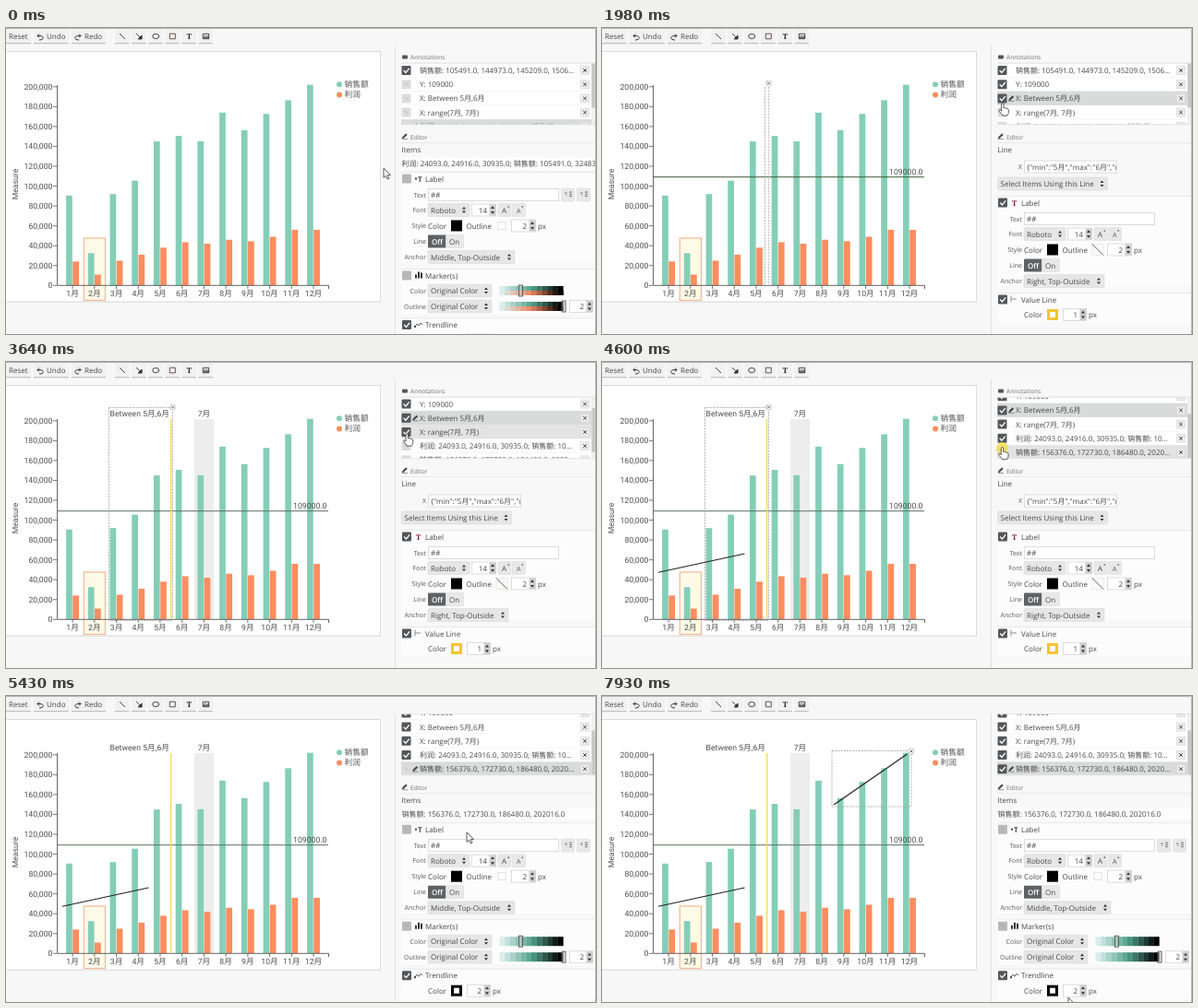
An HTML page for the animation above (8000 ms loop, 639 by 332 pixels).

```html
<!DOCTYPE html>
<html lang="zh">
<head>
<meta charset="utf-8">
<title>Chart annotations</title>
<style>
html, body { margin: 0; width: 100%; height: 100%; overflow: hidden; background: #f7f7f7; }
svg { display: block; width: 639px; height: 332px; }
text { font: 8px "Open Sans", "Noto Sans CJK SC", "Noto Sans CJK", sans-serif; fill: #484848; white-space: pre; text-rendering: geometricPrecision; }
.s { font-size: 7px; fill: #585858; }
.h { font-size: 6.6px; fill: #707070; }
.c { font: 8.7px Roboto, "Noto Sans CJK SC", "Noto Sans CJK", sans-serif; fill: #505050; }
.r { text-anchor: end; }
.m { text-anchor: middle; }
</style>
</head>
<body>
<svg id="stage" viewBox="0 0 639 332" xmlns="http://www.w3.org/2000/svg"></svg>
<script>
const LOOP = 8000;
const GREEN = '#84ceb7', ORANGE = '#fb8d5f', DARK = '#54575a';
const PITCH = 15.2, TOP = 38.4;

// Drawing helpers: each returns markup
const text = (x, y, s, cls = '', more = '') => `<text x="${x}" y="${y}" class="${cls}" ${more}>${s}</text>`;
const rect = (x, y, w, h, fill, stroke = 'none', more = '') =>
  `<rect x="${x}" y="${y}" width="${w}" height="${h}" fill="${fill}" stroke="${stroke}" ${more}/>`;
const path = (d, stroke = '#333', w = 1, fill = 'none', more = '') =>
  `<path d="${d}" stroke="${stroke}" stroke-width="${w}" fill="${fill}" ${more}/>`;
const group = (id, body, more = '') => `<g id="${id}" ${more}>${body}</g>`;

const checkOn = (x, y) => rect(x, y - 5, 10, 10, DARK, 'none', 'rx="1"') +
  path(`M${x + 2.2} ${y}l2.2 2.4 3.8-4.6`, '#fff', 1.3);
const checkOff = (x, y, fill = '#dcdcdc') => rect(x, y - 5, 10, 10, fill, 'none', 'rx="1"') +
  path(`M${x + 3.5} ${y - 1.5}l3 3`, '#aaa', .9);
const closeDot = (x, y) => `<circle cx="${x}" cy="${y}" r="3.2" fill="#f2f2f2" stroke="#c4c4c4" stroke-width=".7"/>` +
  path(`M${x - 1.3} ${y - 1.3}l2.6 2.6m0-2.6l-2.6 2.6`, '#666', .8);
const pen = (x, y) => path(`M${x} ${y + 2.4}l.8-2 3.4-3.2 1.2 1.2-3.4 3.2z`, '#333', .5, '#444') +
  path(`M${x} ${y + 3}h6`, '#555', .6);
const arrows = (x, y, gap = 1) => path(`M${x - 2} ${y - gap}l2-2.6 2 2.6zm0 ${2 * gap}l2 2.6 2-2.6z`, 'none', 0, '#333');
const select = (x, y, w, s) => rect(x, y - 7, w, 14, '#e6e6e6', '#dadada', 'stroke-width=".6" rx="1"') +
  text(x + 3, y + 3, s) + arrows(x + w - 6, y);
const number = (x, y, w, s) => rect(x + .5, y - 6.5, w - 1, 13, '#fff', '#d4d4d4', 'stroke-width=".8"') +
  text(x + w - 10, y + 3, s, 'r') + rect(x + w - 7.5, y - 6, 7, 12, '#cdcdcd') + arrows(x + w - 4, y, 1.6);
const input = (x, y, w, s) => rect(x + .5, y - 6.5, w, 13, '#fff', '#d4d4d4', 'stroke-width=".8"') + text(x + 3, y + 3, s);
const button = (x, y, w, body) => rect(x, y - 7, w, 14, '#e8e8e8', '#dcdcdc', 'stroke-width=".6" rx="1"') + body;
const frame = (x, y, color) => rect(x + 1.5, y - 4.5, 9, 9, '#fff', color, 'stroke-width="3"');
const side = (y, s) => text(455, y + 2.6, s, 's r');

function header(y, h, on, icon, s) {
  return rect(428, y - 7, 210, h, '#fcfcfc') + path(`M428 ${y - 7}h210`, '#e4e4e4', .8) +
    (on ? checkOn(429, y) : checkOff(429, y, '#b8b8b8')) + icon + text(454, y + 3, s);
}

function labelBlock(y, line) {
  const icon = line
    ? text(444, y + 3.2, 'T', '', 'style="font-weight:700;fill:#8a2030;font-family:Noto Serif,serif"')
    : text(446, y + 3, 'T', '', 'style="font-weight:700"') + rect(443, y - 1, 2, 2, '#444');
  const lines = x => button(x, y + 17.5, 14, path(`M${x + 3.5} ${y + 15.5}h2.5m-1.2 2h1.2m2.5-3h3m-3 2.2h3m-3 2.2h3`, '#666', .9));
  const outline = line
    ? rect(531, y + 45, 12, 12, '#fbfaf8', '#e2e2e2', 'stroke-width=".6"') + path(`M531 ${y + 45}l12 12`, '#65483c', .9)
    : rect(533, y + 47, 8, 8, '#fff', '#d4d4d4', 'stroke-width=".7"');
  return header(y, 98, line, icon, 'Label') +
    side(y + 17.5, 'Text') + input(457, y + 17.5, 141, '##') + (line ? '' : lines(601.5) + lines(618.5)) +
    side(y + 34, 'Font') + select(457, y + 34, 45, 'Roboto') + number(504, y + 34, 27, '14') +
    button(533, y + 34, 14, text(537, y + 37, 'A') + path(`M543 ${y + 31}l1.2-1.6 1.2 1.6z`, 'none', 0, '#444')) +
    button(548.5, y + 34, 14, text(553, y + 37, 'A', 's') + path(`M558 ${y + 30}l1.2 1.6 1.2-1.6z`, 'none', 0, '#444')) +
    side(y + 51, 'Style') + text(457, y + 54, 'Color') + rect(482, y + 45, 12, 12, '#000') +
    text(498.5, y + 54, 'Outline') + outline + number(547, y + 51, 27, '2') + text(576, y + 54, 'px') +
    side(y + 68, 'Line') + rect(457, y + 61, 19.5, 14, '#5f6265', 'none', 'rx="1"') +
    text(461, y + 71, 'Off', '', 'style="fill:#fff;font-weight:600"') +
    rect(476.5, y + 61, 19, 14, '#e8e8e8', '#dcdcdc', 'stroke-width=".6"') + text(480, y + 71, 'On') +
    side(y + 85, 'Anchor') + (line ? select(457, y + 85, 87, 'Right, Top-Outside') : select(457, y + 85, 94, 'Middle, Top-Outside'));
}

function ramp(x, y, h, base) {
  const pale = [218, 238, 238];
  let out = '';
  for (let i = 0; i < 12; i++) {
    const k = i / 11;
    const rgb = base.map((v, n) => Math.round(k < .5 ? pale[n] + (v - pale[n]) * k * 2 : v * (1 - k) * 2));
    out += rect(x + i * 5.75, y, 5.9, h, `rgb(${rgb})`);
  }
  return out;
}

function itemsEditor() {
  const g = [80, 162, 138], o = [240, 130, 92];
  const slider = (y, handle) =>
    ramp(534.5, y - 5, 10, g) + `<g class="mixed">${ramp(534.5, y, 5, o)}</g>` +
    rect(handle - 2, y - 6, 4, 12, 'rgba(200,200,200,.4)', '#555', 'stroke-width=".9"');
  const bars = path('M444 271.5v-4m3 4v-7m3 7v-6', '#333', 2);
  const wave = path('M443 324l2-3 2 2 2-3 2 2', '#444', .9) + rect(442, 323, 2, 2, '#444');
  return text(428.5, 135, 'Items') + rect(428, 140.5, 210, 13, '#fdfdfd') + text(428.5, 150, '', '', 'id="picked"') +
    labelBlock(163.5, false) +
    header(268.5, 49, false, bars, 'Marker(s)') +
    side(285, 'Color') + select(457, 285, 69, 'Original Color') + slider(285, 557.5) +
    side(302, 'Outline') + select(457, 302, 69, 'Original Color') + slider(302, 604) + number(610, 302, 26, '2') +
    header(322, 32, true, wave, 'Trendline') +
    text(457, 341.5, 'Color') + frame(482, 338.5, '#000') + number(499, 338.5, 26, '2') + text(527, 341.5, 'px');
}

function lineEditor() {
  return text(428.5, 135, 'Line') + side(150.5, 'X') + rect(457.5, 144, 100, 13, '#fff', '#d4d4d4', 'stroke-width=".8"') +
    text(460, 153.5, '{"min":"5月","max":"6月","or', '', 'clip-path="url(#field)"') +
    select(428.5, 169, 119, 'Select Items Using this Line') +
    labelBlock(189.5, true) +
    header(294.5, 32, true, path('M443 290.5v7m0-3.5h6', '#777', .8), 'Value Line') +
    text(457, 314, 'Color') + frame(482, 311, '#f6c52e') + number(499, 311, 26, '1') + text(527, 314, 'px');
}

const rowNames = ['销售额: 105491.0, 144973.0, 145209.0, 1506…', 'Y: 109000', 'X: Between 5月,6月', 'X: range(7月, 7月)',
  '利润: 24093.0, 24916.0, 30935.0; 销售额: 10…', '销售额: 156376.0, 172730.0, 186480.0, 2020…'];
const checkedAt = [-1, 1100, 1500, 2400, 4120, 6680];

function row(name, i) {
  const y = TOP + PITCH * (i + .5);
  return rect(428, y - PITCH / 2, 206, PITCH, '#fff', 'none', `id="row${i}"`) +
    path(`M428 ${y + PITCH / 2}h206`, '#e6e6e6', .7) +
    group('off' + i, checkOff(428.5, y)) + group('on' + i, checkOn(428.5, y)) + group('pen' + i, pen(440.5, y)) +
    text(448, y + 3, name) + rect(622.5, y - 4.5, 9, 9, '#ececec', '#d8d8d8', 'stroke-width=".7"') +
    path(`M625.2 ${y - 1.8}l3.6 3.6m0-3.6l-3.6 3.6`, '#444', 1);
}

function toolbar() {
  const base = (x, w) => rect(x, 1, w, 16, '#f1f1f1') + path(`M${x} 16.7h${w}`, '#b0b0b0', .9);
  const icons = ['M-3-3L3 3', 'M-3-3L2 2M3 3v-4l-4 4z', 'M-3.5 0a3.5 2.6 0 1 0 7 0a3.5 2.6 0 1 0-7 0', 'M-3-2.8h6v5.6h-6z', '', 'M-3.2-2.7h6.4v5.4h-6.4zm.6 4.4l2-2.6 1.4 1.5 1.2-1 1.2 2.1z'];
  let out = rect(0, 0, 639, 19, '#f7f7f7') + base(0, 27) + text(3, 12, 'Reset') + base(30, 38) + text(44, 12, 'Undo') + base(71, 37) + text(85, 12, 'Redo') +
    path('M36 13c5 0 6-4 1-4.5h-3m2-2l-2 2 2 2', '#333', 1) + path('M79 13c-5 0-6-4-1-4.5h3m-2-2l2 2-2 2', '#333', 1);
  icons.forEach((d, i) => {
    const x = 118 + i * 18.1;
    out += base(x, 15.5) + (d ? path(d, i === 3 ? '#5a4038' : '#333', .9, i === 1 ? '#333' : 'none', `transform="translate(${x + 8} 9)"`)
      : text(x + 8, 12, 'T', 'm', 'style="font-weight:700;font-family:Noto Serif,serif;fill:#223"'));
  });
  return out;
}

function chart() {
  const sales = [90500, 32483, 92000, 105491, 144973, 150600, 145209, 174000, 156376, 172730, 186480, 202016];
  const profit = [24093, 10900, 24916, 30935, 38000, 43500, 42000, 46000, 44500, 49000, 56000, 56000];
  const yOf = v => 279.3 - v * 215.5 / 200000;
  let out = rect(-2, 25, 408, 273, '#ececec') + rect(-2, 25.5, 407.5, 271.5, '#fff', '#d4d4d4', 'stroke-width=".8"') +
    rect(84.3, 228, 23.2, 67.5, '#fdfbe8', '#f5b697', 'stroke-width="1.2"') +
    group('band', rect(204, 62, 21, 217, '#ededed') + text(214.5, 58.5, '7月', 'c m', 'id="bandText"'));
  sales.forEach((v, i) => {
    const x = 72.1 + i * 23.72;
    out += rect(x - 7, yOf(v), 6.7, yOf(0) - yOf(v), GREEN) + rect(x + .2, yOf(profit[i]), 6.7, yOf(0) - yOf(profit[i]), ORANGE) +
      path(`M${x} 279v4`, '#555', .8) + text(x, 291, i + 1 + '月', 'c m');
  });
  for (let v = 0; v <= 200000; v += 20000)
    out += path(`M51 ${yOf(v)}h4`, '#555', .8) + text(50.5, yOf(v) + 3, v.toLocaleString('en-US'), 'c r');
  const dash = 'stroke-dasharray="2 1.2"';
  return out + path('M55.5 62V279.3H349.5V283', '#555', .9) + text(0, 0, 'Measure', 'c m', 'transform="translate(13 169.5) rotate(-90)"') +
    `<circle cx="361" cy="61.3" r="3" fill="${GREEN}"/><circle cx="361" cy="72.6" r="3" fill="${ORANGE}"/>` +
    text(366.5, 64.4, '销售额', 'c') + text(366.5, 75.4, '利润', 'c') +
    group('level', path('M55 161.7H349', '#456', 1, 'none', 'id="levelLine"') + text(347.5, 159, '109000.0', 'c r', 'id="levelText"')) +
    group('between', path('M178.7 62V279', '#f5d655', 1.3) + text(177, 58.5, 'Between 5月,6月', 'c r')) +
    group('narrow', path('M176.5 64V281M180.7 64V281', '#aaa', .9, 'none', dash) + closeDot(180.5, 60)) +
    group('wide', rect(111.5, 49.5, 69, 231, 'none', '#aaa', dash + ' stroke-width=".9"') + closeDot(180.5, 49)) +
    group('trendA', path('M61 228.2L154.5 208', '#222', 1.1)) +
    group('trendB', rect(249, 59.5, 86, 60.5, 'none', '#aaa', dash + ' stroke-width=".9"') + path('M251 118L330.5 63', '#222', 1.2) + closeDot(335, 60));
}

const hand = path('M-1.2 1.2C-1.2-.6 1.2-.6 1.2 1.2V5C2 4.4 3 4.6 3.2 5.4 4 4.9 4.9 5.2 5 6 5.8 5.7 6.5 6.2 6.5 7V9.5C6.5 11.5 5.4 12 5.2 13.2H0C-.5 11.6-3.5 9.2-4 7.8-4.1 6.7-2.8 6.6-1.2 8.2Z', '#333', .8, '#fff');
const arrow = path('M0 0V10.4L2.5 8.2 4.2 12 6 11.2 4.3 7.6H7.5Z', '#333', .8, '#fff');

stage.innerHTML =
  '<defs><clipPath id="list"><rect x="428" y="38.4" width="206" height="66"/></clipPath>' +
  '<clipPath id="field"><rect x="458" y="144" width="99" height="13"/></clipPath></defs>' +
  rect(0, 0, 639, 332, '#f7f7f7') + chart() + rect(421.5, 18, 218, 314, '#f8f8f8') +
  group('panel',
    rect(429, 29.5, 6, 4, '#555', 'none', 'rx="1"') + text(438, 34, 'Annotations', 'h') +
    rect(428, 38.4, 210, 66, '#fff') +
    group('listBox', group('rows', rowNames.map(row).join('')), 'clip-path="url(#list)"') +
    rect(634, 38.4, 5, 66, '#f0f0f0') + rect(634.3, 38.4, 4, 48, '#c8c8c8', 'none', 'id="thumb"') +
    path('M428 104.7h210M428 38.2h210', '#dcdcdc', .8) +
    pen(429, 117.5) + text(438, 120.5, 'Editor', 'h') + path('M428 124.5h210', '#e6e6e6', .8) +
    group('items', itemsEditor()) + group('line', lineEditor())) +
  path('M421.5 18V332', '#e2e2e2', 1) + toolbar() +
  path('M0 .5H638.5V332', '#b8b8b8', 1) +
  group('cursor', '<circle id="spot" cx="0" cy="1" r="6.5" fill="#f6dc45" opacity=".8"/>' + group('hand', hand) + group('arrow', arrow));

const el = id => document.getElementById(id);
const show = (id, on) => el(id).style.display = on ? '' : 'none';
const ease = k => k * k * (3 - 2 * k);
const progress = (t, a, b) => ease(Math.min(1, Math.max(0, (t - a) / (b - a))));

// time, x, y of the pointer tip
const moves = [[70, 409, 152], [830, 434, 58], [1230, 434, 58], [1420, 433.5, 71], [1640, 433.5, 71], [2190, 434, 87], [2500, 434, 87],
  [2800, 435, 75], [3250, 435, 75], [3850, 434, 79], [4400, 434, 79], [4590, 433.5, 92.5], [4870, 433.5, 92.5], [5430, 499, 148],
  [5640, 519, 185], [5900, 515, 268], [6300, 414, 110], [6540, 428.5, 74.5], [6900, 428.5, 74.5], [7240, 470, 203], [7370, 470, 203], [7930, 505, 327]];
const clicks = [[1030, 1230], [1400, 1570], [2330, 2480], [3080, 3220], [4050, 4200], [4560, 4740], [6640, 6780]];

function pointer(t) {
  let a = moves[0];
  for (const b of moves) {
    if (t < b[0]) {
      const k = progress(t, a[0], b[0]);
      return [a[1] + (b[1] - a[1]) * k, a[2] + (b[2] - a[2]) * k];
    }
    a = b;
  }
  return [a[1], a[2]];
}

function draw(t) {
  const [x, y] = pointer(t);
  const scroll = 24 * progress(t, 3400, 3800), lift = 18.8 * progress(t, 5000, 5300);
  const inList = x >= 428 && x < 634 && y > TOP - lift && y < TOP + 66 - lift;
  const hover = inList ? Math.floor((y + lift + scroll - TOP) / PITCH) : -1;
  const chosen = t < 1500 ? 4 : t < 4670 ? 2 : 5;

  el('panel').setAttribute('transform', `translate(0 ${-lift})`);
  el('rows').setAttribute('transform', `translate(0 ${-scroll})`);
  el('thumb').setAttribute('y', TOP + scroll * .74);
  rowNames.forEach((_, i) => {
    el('row' + i).setAttribute('fill', i === chosen ? '#d9dada' : i === hover ? '#e3e3e3' : '#fff');
    show('on' + i, t >= checkedAt[i]);
    show('off' + i, t < checkedAt[i]);
    show('pen' + i, i === chosen);
  });

  show('items', chosen !== 2);
  show('line', chosen === 2);
  el('picked').textContent = chosen === 4 ? '利润: 24093.0, 24916.0, 30935.0; 销售额: 105491.0, 32483.0'
    : '销售额: 156376.0, 172730.0, 186480.0, 202016.0';
  document.querySelectorAll('.mixed').forEach(n => n.style.display = chosen === 4 ? '' : 'none');

  show('level', t >= 1100);
  el('levelLine').setAttribute('stroke', t < 1500 ? '#55803f' : t < 3080 ? '#3f5a36' : '#5c7062');
  el('levelText').style.fill = t < 1500 ? '#4d7038' : '#505050';
  show('band', t >= 2400);
  el('bandText').style.fill = t < 3080 ? '#4d7038' : '#505050';
  show('narrow', t >= 1500 && t < 3150);
  show('between', t >= 3150);
  show('wide', t >= 3150 && t < 4670);
  show('trendA', t >= 4120);
  show('trendB', t >= 6680);

  el('cursor').setAttribute('transform', `translate(${x} ${y})`);
  show('hand', inList);
  show('arrow', !inList);
  show('spot', clicks.some(([a, b]) => t >= a && t < b));
}

const start = performance.now();
function tick() {
  draw((performance.now() - start) % LOOP);
  requestAnimationFrame(tick);
}
tick();
</script>
</body>
</html>
```
